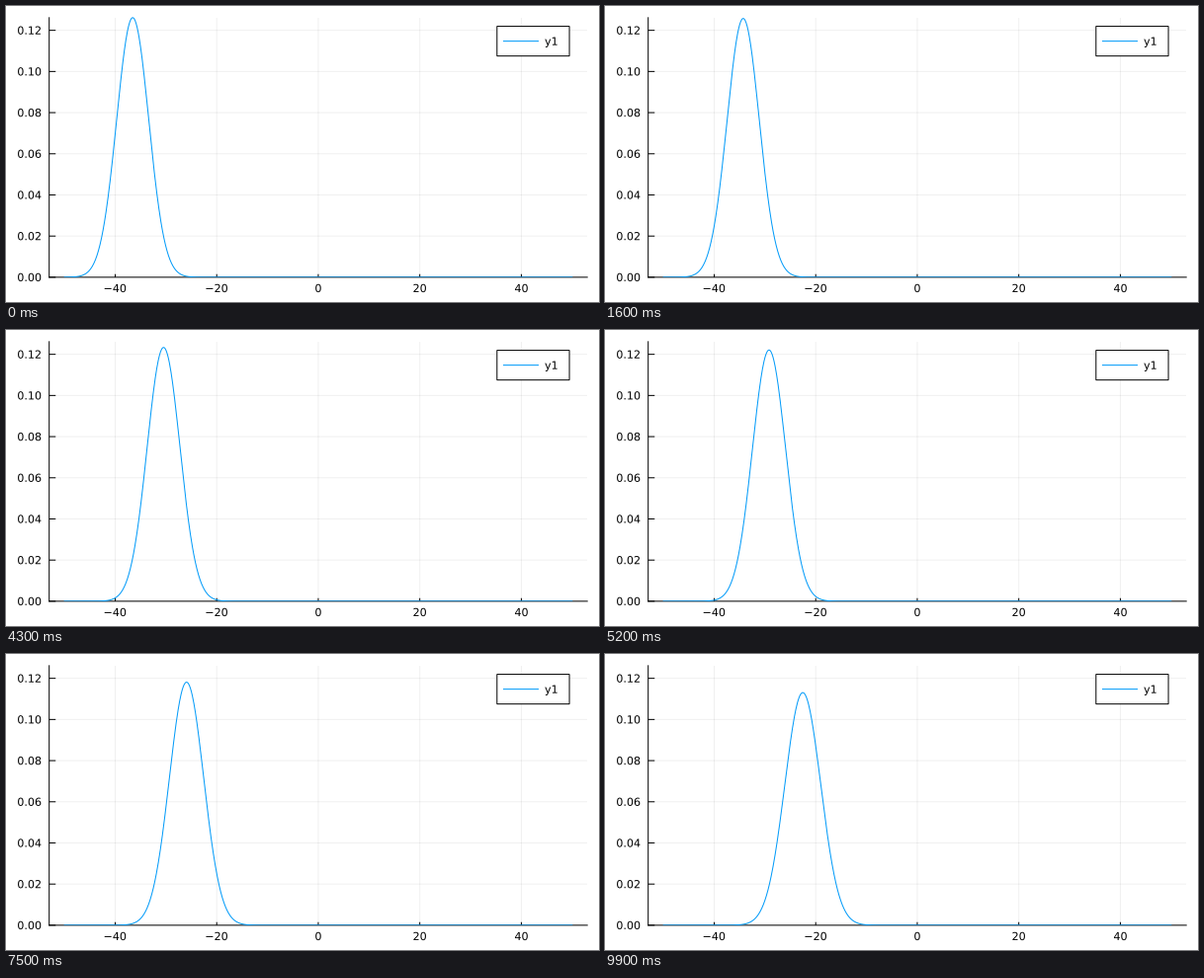
A matplotlib script that plays this animation: 600 by 300 pixels, repeating every 10000 ms.

```python
import numpy as np
import matplotlib.pyplot as plt
from matplotlib.animation import FuncAnimation
from matplotlib.patches import PathPatch, Rectangle
from matplotlib.textpath import TextPath
from matplotlib.transforms import Affine2D, Bbox

W, H, DPI = 600, 300, 100
FRAMES, INTERVAL = 100, 100
BLUE = "#009AF9"
PX = 72 / DPI          # one pixel in points
FONT = 8 * DPI / 72    # text size in pixels
HALF_CAP = 0.365 * FONT
LEFT, TOP, RIGHT, BOTTOM = 43.7, 11.81, 588.19, 274.9
TICK = 0.012           # tick length as a share of the plot area

# Free Gaussian wave packet (hbar = m = 1)
VAR0 = 10.0
X0 = -36.55
SPEED = np.sqrt(2)
DT = 0.1
PEAK = 1 / np.sqrt(2 * np.pi * VAR0)

plt.rcParams["font.family"] = "DejaVu Sans"
plt.rcParams["path.snap"] = False


def density(x, t):
    var = VAR0 * (1 + (t / (2 * VAR0)) ** 2)
    return np.exp(-(x - X0 - SPEED * t) ** 2 / (2 * var)) / np.sqrt(2 * np.pi * var)


fig = plt.figure(figsize=(W / DPI, H / DPI), dpi=DPI, facecolor="white")

ax = fig.add_axes([LEFT / W, 1 - BOTTOM / H, (RIGHT - LEFT) / W, (BOTTOM - TOP) / H])
ax.set_xlim(-53, 53)
ax.set_ylim(0, PEAK)
xticks = np.arange(-40, 41, 20)
yticks = np.arange(7) * 0.02
ax.set_xticks(xticks)
ax.set_yticks(yticks)
ax.set_axisbelow(True)
ax.grid(color="black", alpha=0.06, linewidth=PX)
ax.tick_params(length=0, labelleft=False, labelbottom=False)
ax.spines[["top", "right"]].set_visible(False)
ax.spines[["left", "bottom"]].set_linewidth(PX)
tick_style = dict(color="black", lw=PX, clip_on=False)
ax.vlines(xticks, 0, TICK, transform=ax.get_xaxis_transform(), **tick_style)
ax.hlines(yticks, 0, TICK, transform=ax.get_yaxis_transform(), **tick_style)

x = np.linspace(-50, 50, 1001)
curve, = ax.plot(x, density(x, 0), color=BLUE, lw=PX, zorder=5)
curve.set_clip_box(Bbox([[0, H - 275], [W, H]]))

# Overlay in pixels for text and legend
page = fig.add_axes([0, 0, 1, 1])
page.set_xlim(0, W)
page.set_ylim(H, 0)
page.axis("off")


def label(x, baseline, text, center=False):
    path = TextPath((0, 0), text, size=FONT)
    if center:
        box = path.get_extents()
        x -= (box.x0 + box.x1) / 2
    path = path.transformed(Affine2D().scale(1, -1).translate(x, baseline))
    page.add_patch(PathPatch(path, fc="black", lw=0))


for v in xticks:
    px = LEFT + (v + 53) / 106 * (RIGHT - LEFT)
    label(px, 290, str(v).replace("-", "\u2212"), center=True)
for v in yticks:
    py = BOTTOM - v / PEAK * (BOTTOM - TOP)
    label(11.3, py + HALF_CAP, f"{v:.2f}")

page.add_patch(Rectangle((496.8, 20.57), 73.24, 30.1, fc="white", ec="black", lw=PX))
page.plot([503, 539], [35.6, 35.6], color=BLUE, lw=PX, solid_capstyle="butt")
label(545, 35.6 + HALF_CAP, "y1")


def update(i):
    curve.set_ydata(density(x, i * DT))
    return curve,


anim = FuncAnimation(fig, update, frames=FRAMES, interval=INTERVAL,
                     repeat=True, repeat_delay=0)
plt.show()
```
